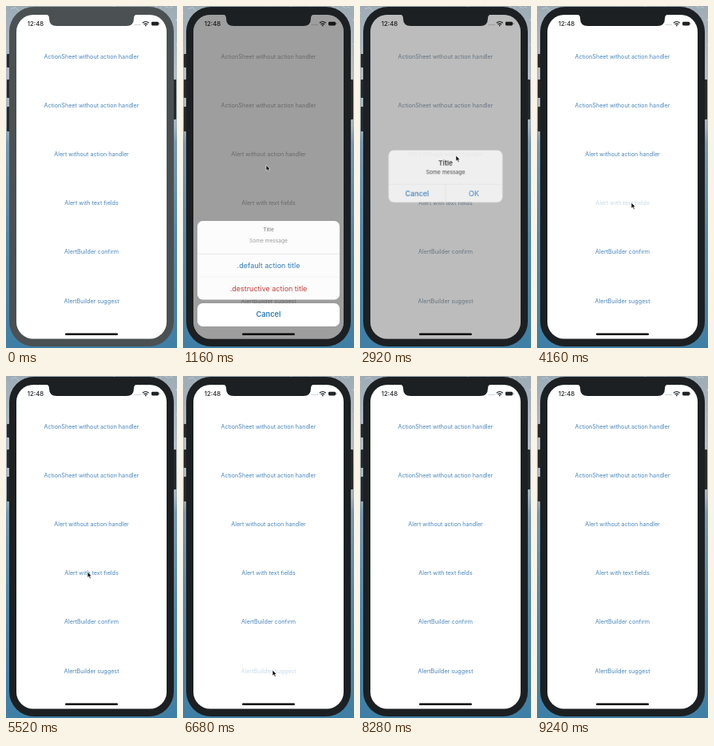
Animation, 214 px wide and 428 px high, one loop 9320 ms. Source, as an HTML page:

```html
<!DOCTYPE html>
<html lang="en">
<head>
<meta charset="utf-8">
<title>Alerts demo</title>
<style>
  html, body { margin: 0; width: 100%; height: 100%; overflow: hidden; background: #8ba2b0; }
  svg { display: block; width: 100vw; height: 100vh; }
  text { font-family: Inter, Roboto, sans-serif; text-anchor: middle; }
</style>
</head>
<body>
<svg id="stage" viewBox="0 0 214 428">
  <defs>
    <linearGradient id="ice" x2="0" y2="1">
      <stop offset="0" stop-color="#9eacb6"/>
      <stop offset=".2" stop-color="#b3bdc5"/>
      <stop offset=".35" stop-color="#a3b3be"/>
      <stop offset=".4" stop-color="#7899ae"/>
      <stop offset=".7" stop-color="#4f88a9"/>
      <stop offset="1" stop-color="#3f7fa5"/>
    </linearGradient>
    <clipPath id="glass"><rect x="13" y="11" width="188" height="405.5" rx="21"/></clipPath>
  </defs>
  <rect width="214" height="428" fill="url(#ice)"/>
  <g id="frost" stroke="#e3e9ed" stroke-width=".7" opacity=".65"/>
  <g fill="#25292b">
    <rect x="1" y="60" width="4" height="17" rx="1"/>
    <rect x="1" y="92" width="4" height="23" rx="1"/>
    <rect x="1" y="126" width="4" height="31" rx="1"/>
    <rect x="209" y="92" width="4" height="50" rx="1"/>
  </g>
  <rect class="bezel" x="4" y="1" width="206" height="425" rx="31"/>
  <g clip-path="url(#glass)">
    <rect x="13" y="11" width="188" height="406" fill="#fff"/>
    <g id="status" fill="#202326">
      <g fill="#b9bbbd">
        <circle cx="161.5" cy="23.5" r=".7"/><circle cx="163.7" cy="23.5" r=".7"/>
        <circle cx="165.9" cy="23.5" r=".7"/><circle cx="168.1" cy="23.5" r=".7"/>
      </g>
      <g fill="none" stroke="#202326" stroke-width="1.2">
        <path d="M170.9 21.2q3.9-3.4 7.8 0M172.5 23q2.3-1.9 4.6 0"/>
      </g>
      <circle cx="174.8" cy="24.4" r=".9"/>
      <rect x="182" y="19.8" width="9" height="4.6" rx="1.3"/>
      <rect x="191.5" y="21.2" width=".8" height="1.8" rx=".4"/>
    </g>
    <g id="labels" fill="#4785bb"/>
    <rect id="dim" x="13" y="11" width="188" height="406" opacity="0"/>
    <g id="keyboard"><rect x="13" y="274" width="188" height="143" fill="#d0d3d8"/></g>
    <g id="sheet">
      <rect x="18" y="269" width="178" height="98.5" rx="6.5" fill="#fcfcfc"/>
      <rect x="18" y="372" width="178" height="29" rx="6.5" fill="#fff"/>
      <path d="M18 310.3h178" stroke="#d9d9dc" stroke-width=".6"/>
      <path d="M18 339.3h178" stroke="#ececee" stroke-width=".5"/>
    </g>
    <g id="alert"/>
    <g id="form"/>
  </g>
  <path class="bezel" d="M49 10.5q5 0 5 5q0 9.5 9.5 9.5h87q9.5 0 9.5-9.5q0-5 5-5z"/>
  <rect x="74" y="409.6" width="66" height="2.5" rx="1.25"/>
  <path id="cursor" d="M0 0v7.2l1.7-1.5 1.2 2.7 1.3-.6-1.2-2.6h2.2z" fill="#111" stroke="#fff" stroke-width=".6"/>
</svg>
<script>
const LOOP = 9320, BLUE = '#2f7bbb';
const $ = id => document.getElementById(id);

function add(parent, tag, attrs, content = '') {
  const el = document.createElementNS('http://www.w3.org/2000/svg', tag);
  for (const key in attrs) el.setAttribute(key, attrs[key]);
  el.textContent = content;
  parent.append(el);
  return el;
}

const write = (parent, content, x, y, size, attrs = {}) =>
  add(parent, 'text', { x, y, dy: '.36em', 'font-size': size, ...attrs }, content);

// steps: [ms, value]
function play(el, prop, steps, easing = 'linear') {
  const last = steps[steps.length - 1];
  const all = [[0, steps[0][1]], ...steps.filter(s => s[0] > 0), [LOOP, last[1]]];
  el.animate(all.map(([t, v]) => ({ offset: t / LOOP, [prop]: v, easing })),
    { duration: LOOP, iterations: Infinity });
}

// Switches a property on and off for each [open, close] span.
const toggle = (el, prop, spans, off, on, rise = 320, fall = 240) =>
  play(el, prop, spans.flatMap(([a, b]) =>
    [[a, off], [a + rise, on], [b, on], [b + fall, off]]), 'ease-out');

const sheets = [[790, 1450], [1920, 2340], [6740, 7130]];
const alerts = [[2760, 3560], [5830, 6310]];
const forms = [[4260, 5190]];
const modals = [...sheets, ...alerts, ...forms].sort((a, b) => a[0] - b[0]);

// Frosty backdrop
let seed = 7;
const rand = () => (seed = seed * 16807 % 2147483647) / 2147483647;
for (let i = 0; i < 110; i++) {
  const x = rand() * 214, y = rand() ** 1.4 * 158;
  add($('frost'), 'path', { d: `M${x} ${y}l${rand() * 14 - 7} ${rand() * 12 - 6}` });
}

// Home screen
write($('status'), '12:48', 37, 22, 7.8, { 'font-weight': 500 });
['ActionSheet without action handler', 'ActionSheet without action handler',
 'Alert without action handler', 'Alert with text fields',
 'AlertBuilder confirm', 'AlertBuilder suggest'].forEach((name, i) => {
  const label = write($('labels'), name, 107, 63 + i * 61.2, 7.2);
  const tap = modals[i][0] - 100;
  play(label, 'opacity', [[tap - 110, 1], [tap - 50, .3], [tap + 50, .3], [tap + 280, 1]]);
});

// Action sheet
const sheet = $('sheet');
write(sheet, 'Title', 107, 280, 6.4, { fill: '#85858b', 'font-weight': 500 });
write(sheet, 'Some message', 107, 294, 6.6, { fill: '#98989d' });
write(sheet, '.default action title', 107, 325, 9, { fill: BLUE });
write(sheet, '.destructive action title', 107, 354, 9, { fill: '#c43c38' });
write(sheet, 'Cancel', 107, 386, 9.2, { fill: BLUE, 'font-weight': 600 });

// Alerts are drawn around their own centre
function buildAlert(box, half, fields) {
  add(box, 'rect', { x: -67.5, y: -half, width: 135, height: half * 2, rx: 6.5, fill: '#f7f7f7' });
  write(box, 'Title', 0, 15 - half, 8, { fill: '#2a2a2c', 'font-weight': 600 });
  write(box, 'Some message', 0, 26 - half, 6.4, { fill: '#3c3c3f' });
  for (let i = 0; i < fields; i++)
    add(box, 'rect', { x: -59.5, y: 33 - half + i * 13, width: 119, height: 12.5,
      fill: '#fff', stroke: '#c9c9cc', 'stroke-width': .5 });
  add(box, 'path', { d: `M-67.5 ${half - 21.5}h135M0 ${half - 21.5}v21.5`, stroke: '#e4e4e6', 'stroke-width': .5 });
  write(box, 'Cancel', -33.7, half - 10.3, 8.5, { fill: BLUE, 'font-weight': 500 });
  write(box, 'OK', 33.7, half - 10.3, 8.5, { fill: BLUE });
}
buildAlert($('alert'), 31, 0);
buildAlert($('form'), 46, 2);

// Keyboard
const keyboard = $('keyboard');
function key(x, y, w, name, size = 9, fill = '#fff') {
  add(keyboard, 'rect', { x, y, width: w, height: 21, rx: 2.5, fill });
  write(keyboard, name, x + w / 2, y + 10.5, size, { fill: '#1c1c1e' });
}
['qwertyuiop', 'asdfghjkl', 'zxcvbnm'].forEach((row, r) =>
  [...row].forEach((c, i) => key(107 + (i - row.length / 2) * 18.6 + 1.5, 280 + r * 27, 15.6, c)));
key(14.5, 334, 20, '⇧', 9, '#abb0ba');
key(179.5, 334, 20, '⌫', 8, '#abb0ba');
key(14.5, 361, 43, '123', 7, '#abb0ba');
key(60.5, 361, 90, 'space', 7);
key(153.5, 361, 46, 'return', 7, '#abb0ba');

// Motion
const shift = (x, y) => `translate(${x}px, ${y}px)`;
toggle($('dim'), 'opacity', modals, 0, .38);
toggle($('labels'), 'fill', modals, '#4785bb', '#a6a6a6');
toggle(sheet, 'transform', sheets, shift(0, 160), shift(0, 0));
toggle(keyboard, 'transform', forms, shift(0, 150), shift(0, 0));
[['alert', alerts, 213], ['form', forms, 150]].forEach(([id, spans, y]) => {
  toggle($(id), 'opacity', spans, 0, 1, 230, 220);
  play($(id), 'transform', spans.flatMap(([a, b]) =>
    [[a, 1.18], [a + 320, 1], [b + 240, 1], [b + 250, 1.18]])
    .map(([t, s]) => [t, `${shift(107, y)} scale(${s})`]), 'ease-out');
});
document.querySelectorAll('.bezel').forEach(el =>
  play(el, 'fill', [[0, '#4b5152'], [40, '#4b5152'], [200, '#1c2022']]));

play($('cursor'), 'transform', [
  [140, 112, 440], [560, 108, 63], [780, 107, 63], [1000, 105, 140], [1160, 104, 199],
  [1380, 106, 353], [1480, 106, 353], [1780, 112, 124], [1960, 112, 124],
  [2240, 110, 325], [2380, 110, 325], [2620, 120, 187], [2940, 120, 187],
  [3400, 140, 233], [3620, 140, 233], [4020, 118, 246], [4280, 118, 246],
  [4980, 76, 184], [5240, 76, 184], [5520, 102, 245], [5680, 106, 307], [5880, 106, 307],
  [6180, 140, 233], [6340, 140, 233], [6580, 112, 368], [6780, 112, 368],
  [7040, 104, 386], [7180, 104, 386], [7440, 102, 407], [7600, 101, 440]
].map(([t, x, y]) => [t, shift(x, y)]), 'ease-in-out');
</script>
</body>
</html>
```
